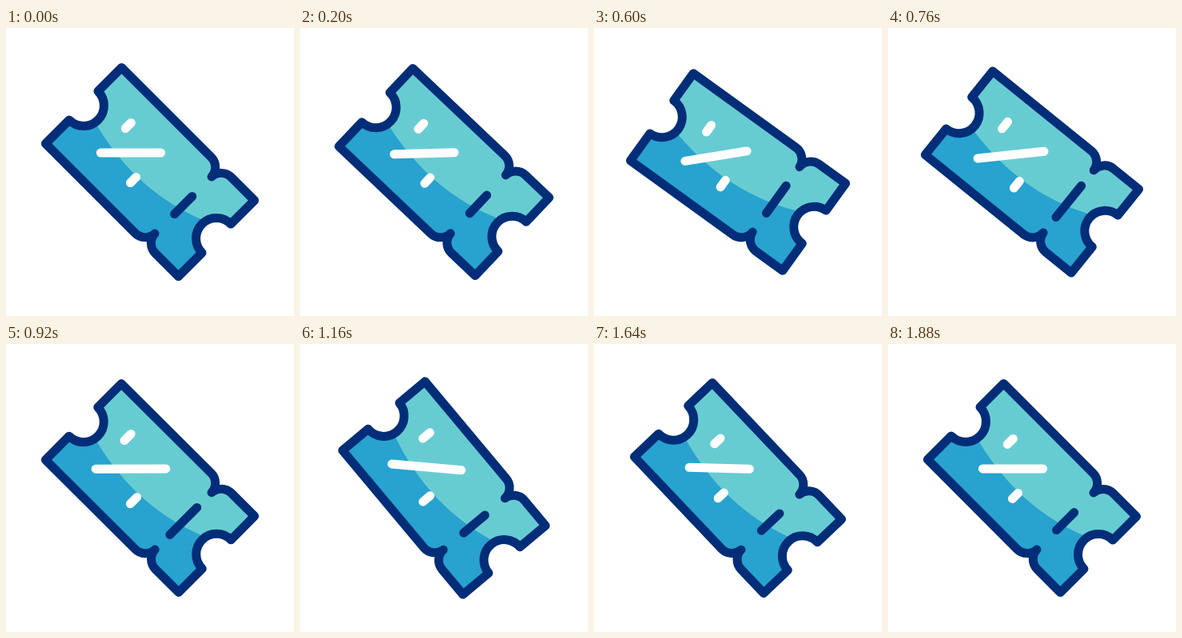
Write an HTML page that moves like this. It is 360 by 360 pixels and loops after 1920 ms.

```html
<!DOCTYPE html>
<html lang="en">
<head>
<meta charset="utf-8">
<title>Discount ticket</title>
<style>
  html, body { margin: 0; width: 100%; height: 100%; overflow: hidden; background: #fff; }
  svg { display: block; width: 100%; height: 100%; }
  .line { fill: none; stroke-width: 11; stroke-linecap: round; stroke-linejoin: round; }
  .navy { stroke: #002d78; }
  .white { stroke: #fff; }
</style>
</head>
<body>
<svg viewBox="0 0 360 360">
  <defs>
    <path id="outline" d="M144.5 49.5 L256.5 161.5 C263 168 263.5 179 257 186 C264 179.5 275 180 281.5 186.5
      L310.5 215.5 L281 245 A25.4 25.4 0 0 0 245 281 L215.5 310.5 L186.5 281.5
      C180 275 179.5 264 186 257 C179 263.5 168 263 161.5 256.5
      L49.5 144.5 L79 115 A25.4 25.4 0 0 0 115 79 Z"/>
    <clipPath id="inside"><use href="#outline"/></clipPath>
  </defs>
  <g id="ticket">
    <use href="#outline" fill="#28a2ce"/>
    <path clip-path="url(#inside)" fill="#67ccd2"
      d="M103.5 104.8 L113.5 121.8 Q163.5 204.8 245.5 239.8 L272 251 L330 215 L145 30 Z"/>
    <use href="#outline" class="line navy"/>
    <path id="tear" class="line navy"/>
    <path id="percent" class="line white"/>
  </g>
</svg>
<script>
const LOOP = 1920, STEP = 40;
const byId = id => document.getElementById(id);
const ticket = byId('ticket'), tear = byId('tear'), percent = byId('percent');

function ease(t, start, end) {
  const p = Math.min(1, Math.max(0, (t - start) / (end - start)));
  return (1 - Math.cos(Math.PI * p)) / 2;
}

// Rises from 0 to 1 and falls back to 0.
const pulse = (t, start, peak, end) => ease(t, start, peak) - ease(t, peak, end);

function segment(x, y, dx, dy) {
  return `M${x - dx} ${y - dy} L${x + dx} ${y + dy} `;
}

function draw(t) {
  const angle = -9.2 * ease(t, 60, 580) + 14.3 * ease(t, 580, 1160) - 5.1 * ease(t, 1160, LOOP);
  ticket.setAttribute('transform', `rotate(${angle} 180 180)`);

  const reach = 11 + 6.9 * pulse(t, 360, 800, 1300);
  tear.setAttribute('d', segment(221.7, 221.5, reach, -reach));

  const grow = 1 + 0.18 * pulse(t, 400, 1040, 1560);
  const dash = 3.5 * grow;
  percent.setAttribute('d',
    segment(156, 156, 37.6 * grow, 0) +
    segment(156 - 3.2 * grow, 156 - 34 * grow, dash, -dash) +
    segment(156 + 3 * grow, 156 + 34 * grow, dash, -dash));
}

const origin = performance.now();
function tick() {
  const t = (performance.now() - origin) % LOOP;
  draw(Math.floor(t / STEP) * STEP);
  requestAnimationFrame(tick);
}
tick();
</script>
</body>
</html>
```
